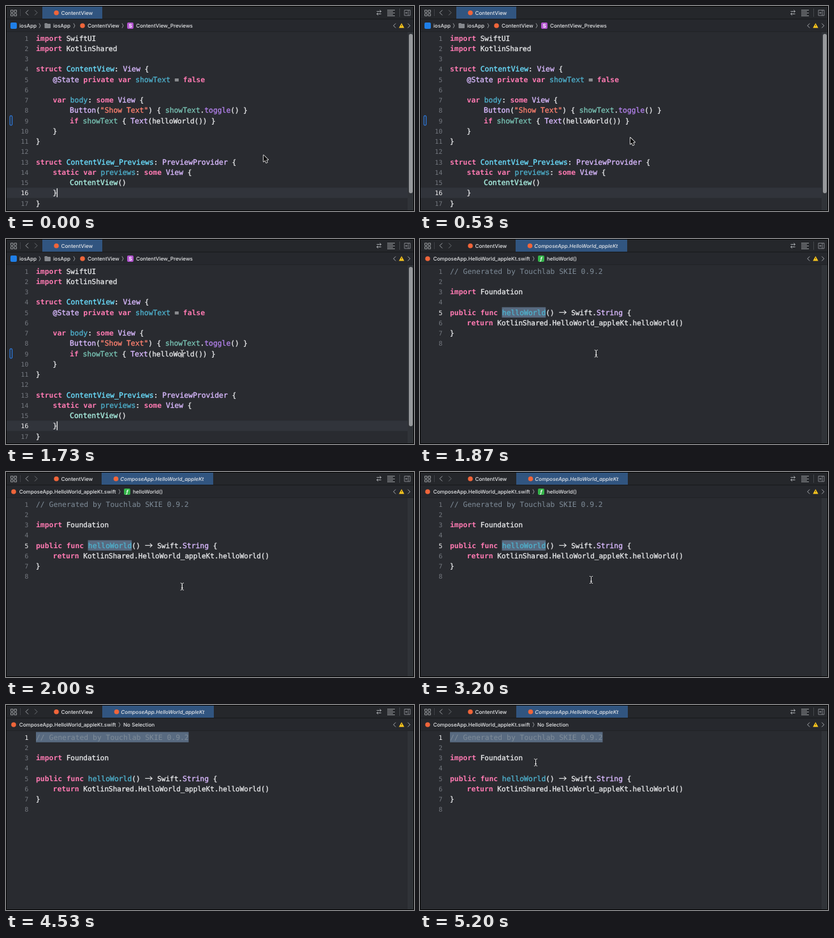
An HTML page with a canvas for the animation above (5.27 s loop, 640 by 323 pixels).

```html
<!DOCTYPE html>
<html lang="en">
<head>
<meta charset="utf-8">
<title>Jump to definition</title>
<style>
  html, body { margin: 0; width: 100%; height: 100%; overflow: hidden; background: #292b30; }
  canvas { display: block; width: 640px; height: 323px; }
</style>
</head>
<body>
<canvas id="stage"></canvas>
<script>
const W = 640, H = 323, LOOP = 5270;
const canvas = document.getElementById('stage');
const ctx = canvas.getContext('2d');
const dpr = window.devicePixelRatio || 1;
canvas.width = W * dpr;
canvas.height = H * dpr;

const MONO = '"DejaVu Sans Mono", monospace';
const UI = 'Inter, "Liberation Sans", sans-serif';
const PLAIN = 11.03, STYLED = 11.38, ADVANCE = 0.602;
const LEFT = 47, ROW = 16.25;
const ORANGE = '#f0653a', SELECTION = '#586a80', TEXT = '#e6e7e9', ICON = '#a3a6aa';

const COLORS = {
  k: '#ff7ab2', // keyword
  d: '#6bdfff', // type declaration
  v: '#4eb0cc', // other declaration
  t: '#dabaff', // library type
  f: '#b281eb', // library function
  p: '#78c2b3', // project property
  c: '#acf2e4', // project type
  s: '#ff8170', // string
  n: '#7f8c98'  // comment
};

// ~xword~ sets "word" in style x
const VIEW_FILE = [
  '~kimport~ SwiftUI',
  '~kimport~ KotlinShared',
  '',
  '~kstruct~ ~dContentView~: ~tView~ {',
  '    ~t@State~ ~kprivate~ ~kvar~ ~vshowText~ = ~kfalse~',
  '',
  '    ~kvar~ ~vbody~: ~ksome~ ~tView~ {',
  '        ~tButton~(~s"Show Text"~) { ~pshowText~.~ftoggle~() }',
  '        ~kif~ ~pshowText~ { ~tText~(helloWorld()) }',
  '    }',
  '}',
  '',
  '~kstruct~ ~dContentView_Previews~: ~tPreviewProvider~ {',
  '    ~kstatic~ ~kvar~ ~vpreviews~: ~ksome~ ~tView~ {',
  '        ~cContentView~()',
  '    }',
  '}'
];
const KT_FILE = [
  '~n// Generated by Touchlab SKIE 0.9.2~',
  '',
  '~kimport~ Foundation',
  '',
  '~kpublic~ ~kfunc~ ~vhelloWorld~() -> Swift.~tString~ {',
  '    ~kreturn~ KotlinShared.HelloWorld_appleKt.helloWorld()',
  '}',
  ''
];

const clamp = v => Math.max(0, Math.min(1, v));
const smooth = v => v * v * (3 - 2 * v);
const lerp = (a, b, k) => a + (b - a) * k;
const rowTop = n => 42.4 + (n - 1) * ROW;
const baseline = n => 54.6 + (n - 1) * ROW;

function rect(x, y, w, h, color, r = 0) {
  ctx.fillStyle = color;
  ctx.beginPath();
  ctx.roundRect(x, y, w, h, r);
  ctx.fill();
}

function line(points, color = ICON, width = 1) {
  ctx.strokeStyle = color;
  ctx.lineWidth = width;
  ctx.beginPath();
  for (let i = 0; i < points.length; i += 2) ctx.lineTo(points[i], points[i + 1]);
  ctx.stroke();
}

function dot(x, y, r, color) {
  ctx.fillStyle = color;
  ctx.beginPath();
  ctx.arc(x, y, r, 0, Math.PI * 2);
  ctx.fill();
}

// "extra" thickens the strokes towards a medium weight
function text(str, x, y, font, color, align = 'left', extra = 0) {
  ctx.font = font;
  ctx.fillStyle = color;
  ctx.textAlign = align;
  ctx.fillText(str, x, y);
  if (extra) {
    ctx.lineJoin = 'round';
    ctx.lineWidth = extra;
    ctx.strokeStyle = color;
    ctx.strokeText(str, x, y);
  }
}

const label = (str, x, y, style = '500') => text(str, x, y, `${style} 8.1px ${UI}`, TEXT);

function chevron(x, y, dir, size, color) {
  line([x - dir * size / 2, y - size, x + dir * size / 2, y, x - dir * size / 2, y + size], color);
}

function separator(x) {
  line([x - 1, 27.3, x + 1, 31, x - 1, 34.7], ICON, 0.9);
}

function arrow(x, y) {
  line([x + 1, y, x + 12, y], TEXT, 1.1);
  line([x + 8.6, y - 3, x + 12, y, x + 8.6, y + 3], TEXT, 1.1);
}

function codeLine(src, n) {
  let x = LEFT;
  const y = baseline(n);
  src.split('~').forEach((part, i) => {
    const kind = i % 2 ? part[0] : '';
    const word = kind ? part.slice(1) : part;
    const size = kind ? STYLED : PLAIN;
    const step = size * ADVANCE;
    const font = `${kind === 'k' ? 'bold ' : ''}${size}px ${MONO}`;
    const extra = kind === 'k' || kind === 'n' ? 0 : 0.35;
    const write = (str, col) => text(str, x + col * step, y, font, COLORS[kind] || TEXT, 'left', extra);
    const at = word.indexOf('->');
    if (at < 0) {
      write(word, 0);
    } else {
      write(word.slice(0, at), 0);
      arrow(x + at * step, y - 4);
      write(word.slice(at + 2), at + 2);
    }
    x += word.length * step;
  });
}

function code(lines, current) {
  lines.forEach((src, i) => {
    const n = i + 1;
    text(n, 35.3, baseline(n), `10px ${MONO}`, n === current ? '#f0f0f1' : '#73777e', 'right');
    codeLine(src, n);
  });
}

function toolbar() {
  rect(0, 0, W, 21, '#25272b');
  rect(0, 21, W, 20, '#26282d');
  for (const x of [7.5, 13]) {
    for (const y of [6.5, 12]) {
      ctx.strokeStyle = ICON;
      ctx.lineWidth = 0.9;
      ctx.strokeRect(x, y, 3.6, 3.6);
    }
  }
  line([22.5, 5, 22.5, 16], '#3d4045');
  chevron(33, 10.5, -1, 4);
  chevron(47, 10.5, 1, 4, '#6c6f74');

  line([581.5, 8.5, 588.5, 8.5]);
  line([586.3, 6.3, 588.5, 8.5, 586.3, 10.7]);
  line([588.5, 12.5, 581.5, 12.5]);
  line([583.7, 10.3, 581.5, 12.5, 583.7, 14.7]);
  [12, 9, 12, 9, 12].forEach((w, i) => line([598, 6.5 + i * 2.25, 598 + w, 6.5 + i * 2.25], ICON, 0.9));
  line([617.5, 4, 617.5, 17], '#44474c');
  ctx.strokeStyle = '#8b8e93';
  ctx.lineWidth = 0.9;
  ctx.strokeRect(625, 6.5, 9, 8.5);
  line([631, 6.5, 631, 15], '#8b8e93', 0.9);
  line([626.3, 10.8, 629.7, 10.8], '#8b8e93', 0.9);
  line([628, 9.1, 628, 12.5], '#8b8e93', 0.9);
}

function warnings() {
  chevron(609.5, 31, -1, 3.5);
  ctx.fillStyle = '#ffc81f';
  ctx.beginPath();
  ctx.moveTo(620.5, 27);
  ctx.lineTo(624.7, 34.5);
  ctx.lineTo(616.3, 34.5);
  ctx.fill();
  line([620.5, 29.5, 620.5, 32], '#4a3c08', 0.8);
  chevron(632, 31, 1, 3.5);
}

function symbol(letter, x, color, style) {
  rect(x, 26, 10, 10, color, 2);
  text(letter, x + 5, 34, `${style} 8px ${UI}`, '#fff', 'center');
}

function tab(x, w, active) {
  rect(x, 0.5, w, 20, active ? '#315580' : '#25272b');
}

function frameLines() {
  line([0, 20.5, W, 20.5], '#17191c');
  line([0, 40.5, W, 40.5], '#202226');
  ctx.strokeStyle = '#000';
  ctx.lineWidth = 1;
  ctx.strokeRect(0.5, 0.5, W - 1, H - 1);
}

function viewFile(t) {
  rect(0, rowTop(16), 630, ROW, '#31343b');
  tab(57, 94, true);
  dot(79, 10.8, 3.8, ORANGE);
  label('ContentView', 86.5, 13.7);

  rect(7, 26, 10, 10, '#1f7fe8', 2);
  label('iosApp', 21, 34);
  separator(53);
  rect(60.5, 27, 4.5, 3, '#85888d', 1);
  rect(60.5, 28, 9.5, 7, '#85888d', 1);
  label('iosApp', 74, 34);
  separator(107);
  dot(120, 31, 3.8, ORANGE);
  label('ContentView', 128, 34);
  separator(183);
  symbol('S', 190, '#b354cf', 'bold');
  label('ContentView_Previews', 204, 34);

  code(VIEW_FILE, 16);
  ctx.strokeStyle = '#2e7be0';
  ctx.lineWidth = 1.2;
  ctx.beginPath();
  ctx.roundRect(6.2, rowTop(9) + 0.5, 3.4, 15, 1.5);
  ctx.stroke();
  rect(632, 44, 6, 251, '#97999c', 3);

  if (t >= 1000 && t < 1670) {
    rect(228.4, rowTop(9) + 0.7, 80.5, 15.5, '#1f56a3', 2);
    text('helloWorld()', 229, baseline(9), `bold ${PLAIN}px ${MONO}`, '#fff');
  }
  if ((t + 350) % 1010 < 575) rect(79.6, rowTop(16) + 1, 1.2, 14, '#fff');
}

function ktFile(t) {
  const clicked = t >= 3940;
  const shift = clamp((t - 2340) / 190);
  tab(57, 93, false);
  tab(150 + shift, 175, true);
  dot(79, 10.8, 3.8, ORANGE);
  label('ContentView', 86.5, 13.7);
  dot(172.5 + shift, 10.8, 3.8, ORANGE);
  label('ComposeApp.HelloWorld_appleKt', 179.3 + shift, 13.7, 'italic 500');

  dot(12, 31, 3.8, ORANGE);
  label('ComposeApp.HelloWorld_appleKt.swift', 20.7, 34);
  separator(178);
  if (clicked) {
    label('No Selection', 184, 34);
  } else {
    symbol('ƒ', 185, '#35b54a', 'italic bold');
    label('helloWorld()', 199, 34);
  }

  if (!clicked) rect(128.5, rowTop(5), 68.7, ROW, SELECTION);
  if (t >= 4530) rect(LEFT, rowTop(1), 239.5, ROW, SELECTION);
  code(KT_FILE, clicked ? 1 : 5);
  if (clicked && t < 4530) rect(t < 4270 ? 163.4 : 46.6, rowTop(1) + 1, 1.2, 14, '#fff');
}

function shape(points, x, y, fill, stroke) {
  ctx.beginPath();
  for (let i = 0; i < points.length; i += 2) ctx.lineTo(x + points[i], y + points[i + 1]);
  ctx.closePath();
  ctx.lineJoin = 'round';
  ctx.lineWidth = 1.6;
  ctx.strokeStyle = stroke;
  ctx.stroke();
  ctx.fillStyle = fill;
  ctx.fill();
}

function pointer(x, y) {
  shape([0, 0, 0, 10.2, 2.4, 8, 4.1, 12, 5.9, 11.2, 4.3, 7.4, 7.3, 7.2], x, y, '#0b0b0c', '#f4f4f4');
}

function hand(x, y) {
  shape([-1, 0, 0.8, 0, 1, 4, 4.5, 4.8, 5, 6, 4.2, 9, 3.4, 11, -1.4, 11,
    -4, 7.2, -3.4, 6.2, -1.2, 7.2], x, y, '#fff', '#111');
}

function beam(x, y) {
  for (const [color, width] of [['#1b1d21', 2.2], ['#f0f0f1', 1]]) {
    for (const side of [-1, 1]) {
      const out = x + side * 2.6, near = x + side * 0.9;
      line([out, y - 5.6, near, y - 5.3, x, y - 4.2, x, y + 4.2, near, y + 5.3, out, y + 5.6], color, width);
    }
    line([x - 1.5, y + 2.3, x + 1.5, y + 2.3], color, width);
  }
}

function cursor(t) {
  if (t < 530) {
    const k = clamp((t - 30) / 500);
    pointer(lerp(404, 330, k), lerp(235, 207.5, k));
  } else if (t < 1000) {
    const k = 1 - (1 - clamp((t - 530) / 450)) ** 1.6;
    pointer(lerp(330, 278, k), lerp(207.5, 181, k));
  } else if (t < 1670) {
    hand(279, 182);
  } else if (t < 4270) {
    const a = smooth(clamp((t - 3140) / 260));
    const b = smooth(clamp((t - 3540) / 320));
    beam(lerp(lerp(276.3, 220.5, a), 162, b), lerp(lerp(180.5, 104, a), 54, b));
  } else if (t >= 5070) {
    const k = clamp((t - 5070) / 130);
    beam(lerp(176, 181.5, k), lerp(71.5, 90.5, k));
  }
}

function draw(t) {
  ctx.setTransform(dpr, 0, 0, dpr, 0, 0);
  ctx.textRendering = 'geometricPrecision';
  rect(0, 0, W, H, '#292b30');
  rect(630, 41, 10, H - 41, '#303338');
  toolbar();
  if (t < 1870) viewFile(t);
  else ktFile(t);
  warnings();
  frameLines();
  cursor(t);
}

const start = performance.now();
function tick() {
  draw((performance.now() - start) % LOOP);
  requestAnimationFrame(tick);
}
tick();
</script>
</body>
</html>
```
